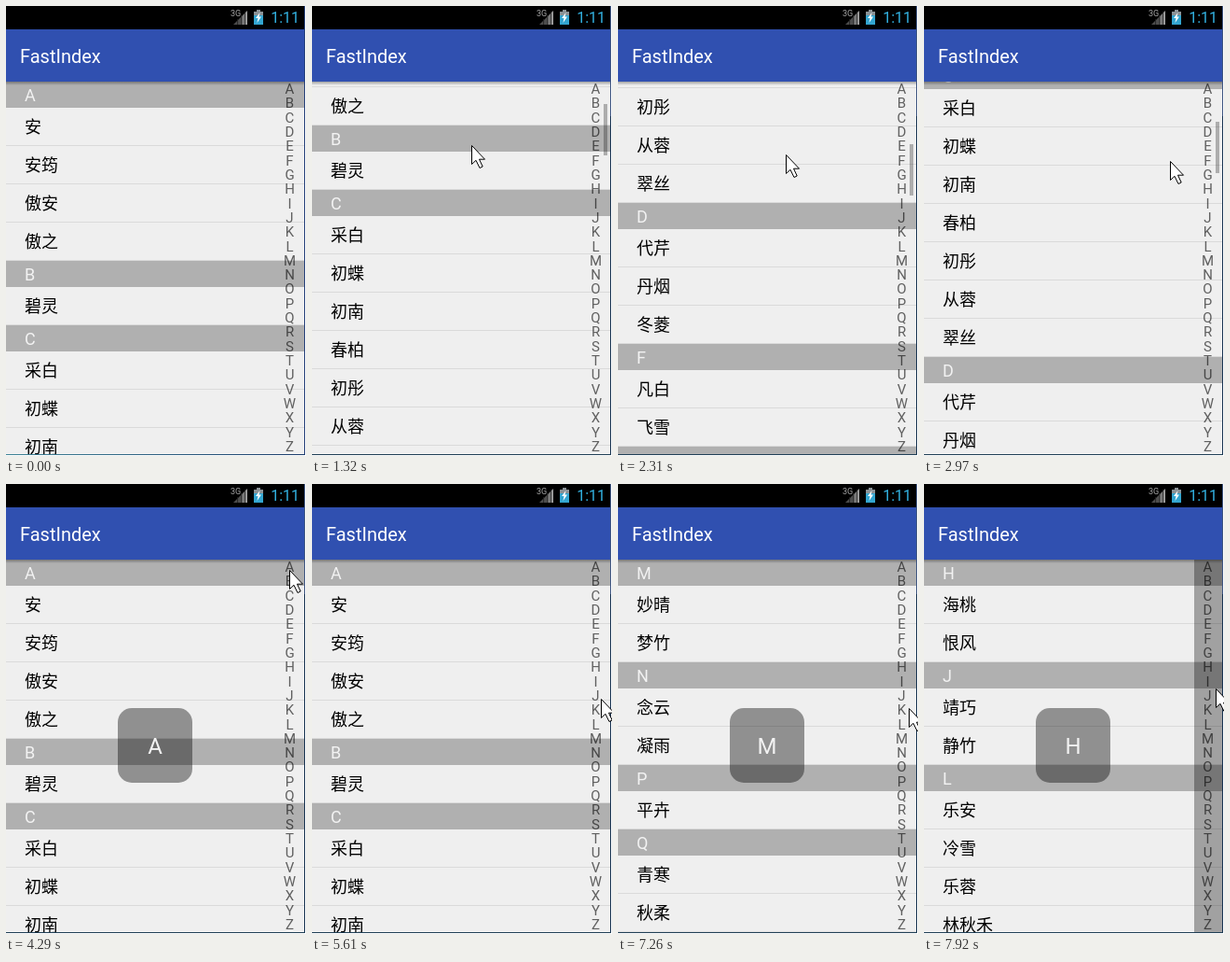
These frames come from a looping animation (322x482 px, 8000 ms). An HTML page:

```html
<!DOCTYPE html>
<html lang="zh-CN">
<head>
<meta charset="utf-8">
<title>FastIndex</title>
<style>
  html, body { margin: 0; width: 100%; height: 100%; overflow: hidden; background: #fff; }
  body { position: relative; font-family: Roboto, "Noto Sans CJK SC", "Noto Sans CJK", sans-serif; }
  div, svg { position: absolute; box-sizing: border-box; }
  #stage { left: 0; top: 0; width: 322px; height: 482px; overflow: hidden; background: #fff; }
  #status { left: 0; top: 0; width: 320px; height: 25px; background: #000; }
  #bar { left: 0; top: 25px; width: 320px; height: 56px; padding-left: 15px; background: #3050b0;
         color: #fff; font-size: 20px; line-height: 58px; }
  #view { left: 0; top: 81px; width: 320px; height: 399px; overflow: hidden; background: #efefef; }
  #list { left: 0; top: 0; width: 320px; font-size: 18px; }
  #list div { position: relative; padding: 1px 0 0 20px; white-space: nowrap; overflow: hidden; }
  #list .head { height: 28px; line-height: 28px; background: #b0b0b0; color: #f2f2f2; }
  #list .row { height: 41px; line-height: 40px; border-bottom: 1px solid #dadada; color: #000; }
  #shadow { left: 0; top: 0; width: 320px; height: 4px;
            background: linear-gradient(rgba(0,0,0,.32), rgba(0,0,0,0)); }
  #thumb { left: 313px; width: 4px; height: 55px; background: rgba(0,0,0,.28); }
  #index { left: 290px; top: 0; width: 30px; height: 399px; font-size: 15px; color: rgba(0,0,0,.6); }
  #index.pressed { background: rgba(0,0,0,.33); }
  #index div { left: 0; width: 29px; height: 16px; line-height: 16px; text-align: center; }
  #toast { left: 120px; top: 240px; width: 80px; height: 80px; border-radius: 15px;
           background: rgba(0,0,0,.4); color: #f2f2f2; font-size: 24px; line-height: 82px; text-align: center; }
  #edgeR { left: 320px; top: 0; width: 1px; height: 481px; background: #243f78; }
  #edgeB { left: 0; top: 480px; width: 321px; height: 1px;
           background: linear-gradient(90deg, #3f8496, #1c3d6c); }
  .settled #edgeR { background: linear-gradient(#3d5580 118px, #16324f 118px); }
  .settled #edgeB { background: #1f3f55; }
  #cursor { left: 0; top: 0; overflow: visible; }
</style>
</head>
<body>
<div id="stage">
  <div id="status">
    <svg width="320" height="25">
      <defs>
        <linearGradient id="sig">
          <stop offset=".45" stop-color="#4c4c4c"/><stop offset="1" stop-color="#a4a4a4"/>
        </linearGradient>
      </defs>
      <path d="M259 5V20H244Z" fill="url(#sig)"/>
      <path d="M248.500 14V20M252.500 10V20M256.500 6V20" stroke="#222" stroke-width=".8"/>
      <text x="241" y="11" font-size="9" fill="#a8a8a8">3G</text>
      <path d="M269 4h4v2h3v14h-10V6h3z" fill="#8b9296"/>
      <path d="M266 10h10v10h-10z" fill="#33a5d0"/>
      <path d="M272.500 7l-4.500 6h2.500l-1 5 4.500-6.500h-2.500z" fill="#fff"/>
      <text x="315" y="18" font-size="16" text-anchor="end" fill="#33b5e5">1:11</text>
    </svg>
  </div>
  <div id="bar">FastIndex</div>
  <div id="view">
    <div id="list"></div>
    <div id="thumb"></div>
    <div id="shadow"></div>
    <div id="index"></div>
  </div>
  <div id="toast"></div>
  <div id="edgeR"></div>
  <div id="edgeB"></div>
  <svg id="cursor" width="16" height="26">
    <path d="M.5 .5V20.500L5 16.300L9 24.500L12.200 23L8.500 15.200H14.500Z" fill="#fff" stroke="#000"/>
  </svg>
</div>
<script>
const $ = id => document.getElementById(id);
const ROW = 41, HEAD = 28, LOOP = 8000, STEP = 330;

const sections = {
  A: '安 安筠 傲安 傲之', B: '碧灵', C: '采白 初蝶 初南 春柏 初彤 从蓉 翠丝',
  D: '代芹 丹烟 冬菱', F: '凡白 飞雪', H: '海桃 恨风', J: '靖巧 静竹',
  L: '乐安 冷雪 乐蓉 林秋禾 凌晴 绿夏', M: '妙晴 梦竹', N: '念云 凝雨',
  P: '平卉', Q: '青寒 秋柔', S: '思松 诗蕊 书雁'
};

function add(parent, text, cls) {
  const el = document.createElement('div');
  el.textContent = text;
  if (cls) el.className = cls;
  parent.append(el);
  return el;
}

// Build the list and note where each section begins.
const start = {};
let height = 0;
for (const [letter, names] of Object.entries(sections)) {
  start[letter] = height;
  add($('list'), letter, 'head');
  const rows = names.split(' ');
  rows.forEach(name => add($('list'), name, 'row'));
  height += HEAD + ROW * rows.length;
}

[...'ABCDEFGHIJKLMNOPQRSTUVWXYZ'].forEach((c, i) => {
  add($('index'), c).style.top = i * 15.32 + 'px';
});

const at = (x, y, more) => ({ x, y, ...more });
const jump = (letter, pressed) => ({ scroll: start[letter], toast: letter, pressed });

// Each step lists only what differs from the one before.
const changes = [
  { scroll: 0, shown: false, thumb: false, toast: '', pressed: false, settled: false },
  at(139, 279, { shown: true }),
  at(171, 348),
  at(171, 149, { scroll: 145, thumb: true, settled: true }),
  { scroll: 250 },
  { scroll: 362 },
  at(180, 159, { scroll: 446 }),
  at(200, 246, { scroll: 357 }),
  at(264, 166, { scroll: 281 }),
  at(296, 102),
  at(303, 92, { thumb: false }),
  at(304, 92),
  jump('A', false),
  { toast: '' },
  at(310, 120),
  at(314, 203),
  at(310, 230),
  at(311, 232, jump('J', true)),
  at(311, 233, { pressed: false }),
  at(310, 276, { toast: '' }),
  jump('M', true),
  at(312, 240, { pressed: false }),
  at(313, 180, { toast: '' }),
  at(313, 219, jump('H', true))
];
let last = {};
const states = changes.map(c => last = { ...last, ...c });

const show = (el, on) => el.style.visibility = on ? 'visible' : 'hidden';

function draw(s) {
  $('list').style.top = -s.scroll + 'px';
  $('thumb').style.top = Math.round(3 + s.scroll * 0.143) + 'px';
  show($('thumb'), s.thumb);
  show($('toast'), s.toast);
  $('toast').textContent = s.toast;
  $('index').className = s.pressed ? 'pressed' : '';
  $('stage').className = s.settled ? 'settled' : '';
  show($('cursor'), s.shown);
  $('cursor').style.transform = `translate(${s.x || 0}px, ${s.y || 0}px)`;
}

let shownStep = -1;
function tick() {
  const t = performance.now() % LOOP;
  const step = Math.max(0, Math.floor(t / STEP) - 1);
  if (step !== shownStep) draw(states[shownStep = step]);
  requestAnimationFrame(tick);
}
tick();
</script>
</body>
</html>
```
